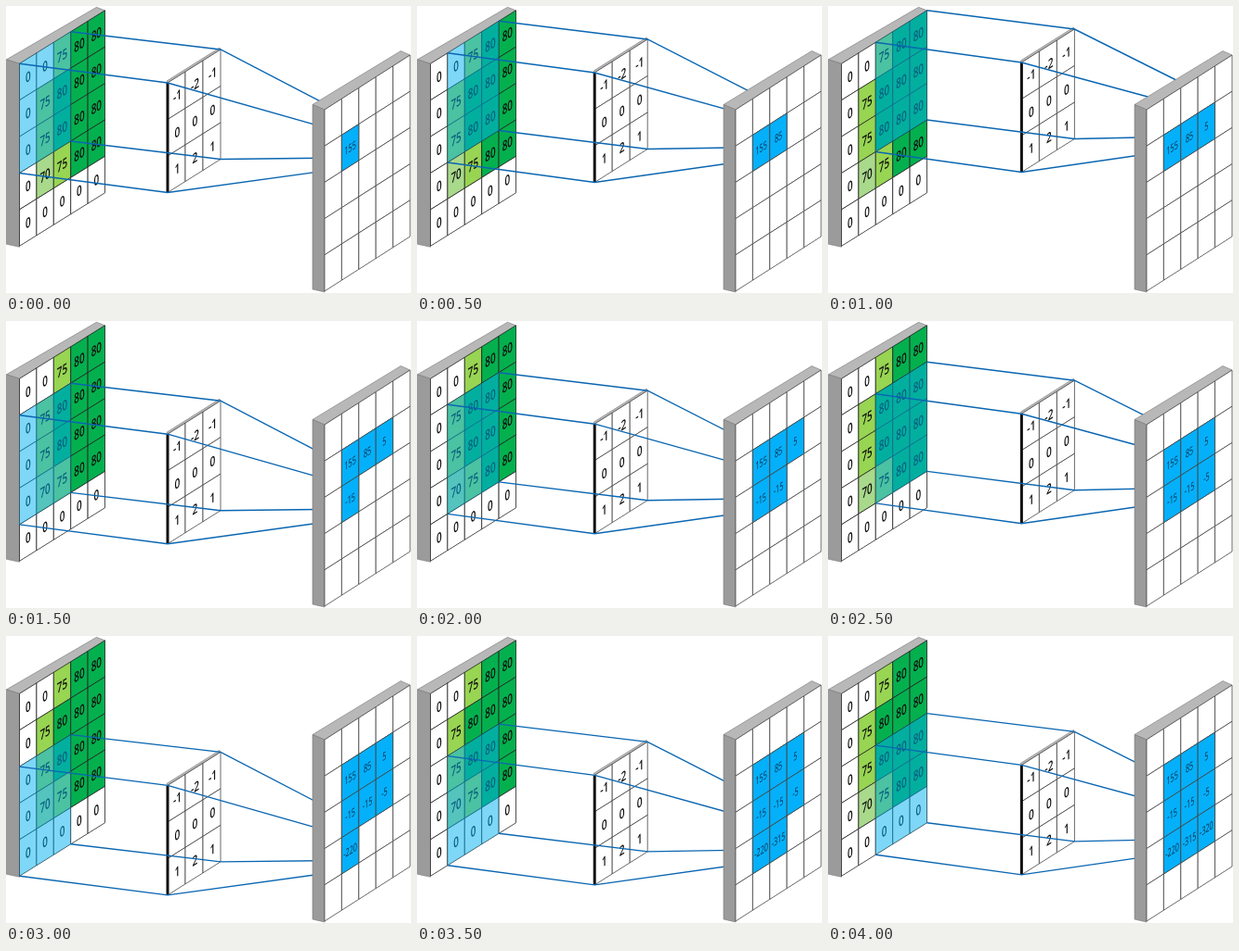
Write an HTML page that moves like this. It is 436 px wide and 310 px high and loops after 4500 ms.

```html
<!DOCTYPE html>
<html lang="en">
<head>
<meta charset="utf-8">
<title>Convolution</title>
<style>
  html, body { margin: 0; width: 100%; height: 100%; overflow: hidden; background: #fff; }
  svg { display: block; width: 436px; height: 310px; }
  text { font-family: "Open Sans", "Noto Sans", sans-serif; font-weight: 600; text-anchor: middle; fill: #111; }
  .cell { stroke: #444; stroke-width: .8; }
  .side { fill: #9b9b9b; stroke: #777; stroke-width: .6; }
  .edge { fill: #b8b8b8; stroke: #777; stroke-width: .6; }
  .patch { fill: #00b0f0; fill-opacity: .5; }
  .ray { fill: none; stroke: #0a66b2; stroke-width: 1.4; }
  #input .cell { stroke: #222; }
  #output text { fill: #0b2c48; font-weight: 400; }
</style>
</head>
<body>
<svg viewBox="0 0 436 310">
  <g id="input"></g>
  <g id="kernel"></g>
  <g id="rays"></g>
  <g id="output"></g>
</svg>
<script>
const STEP_MS = 500;
const WHITE = '#fff', PALE = '#a9d98b', LIME = '#98d552', GREEN = '#04b04e', BLUE = '#05b0fa';
const $ = id => document.getElementById(id);

const inputValues = [
  [0, 0, 75, 80, 80],
  [0, 75, 80, 80, 80],
  [0, 75, 80, 80, 80],
  [0, 70, 75, 80, 80],
  [0, 0, 0, 0, 0]
];
const kernelValues = [[-1, -2, -1], [0, 0, 0], [1, 2, 1]];
const results = [155, 85, 5, -15, -15, -5, -220, -315, -320];
const shades = { 0: WHITE, 70: PALE, 75: LIME, 80: GREEN };

// Oblique planes: origin, column vector (dx, dy), row height
const inputPlane = { x: 14.5, y: 62.3, dx: 18.4, dy: -11.5, h: 39.4 };
const outputPlane = { x: 343, y: 112, dx: 18.4, dy: -11.8, h: 39.2 };
const kernelPlane = { x: 174, y: 83, dx: 19, dy: -12, h: 39.5 };

function add(parent, tag, attrs) {
  const node = document.createElementNS('http://www.w3.org/2000/svg', tag);
  for (const name in attrs) node.setAttribute(name, attrs[name]);
  return parent.appendChild(node);
}

const at = (p, col, row) => [p.x + col * p.dx, p.y + col * p.dy + row * p.h];

const quad = (p, col, row, n = 1) =>
  [at(p, col, row), at(p, col + n, row), at(p, col + n, row + n), at(p, col, row + n)];

const polygon = (parent, points, attrs) =>
  add(parent, 'polygon', { points: points.join(' '), ...attrs });

function label(parent, p, col, row, value, size, squeeze) {
  const [x, y] = at(p, col + .5, row + .5);
  const slope = squeeze * p.dy / p.dx;
  const node = add(parent, 'text', {
    transform: `matrix(${squeeze} ${slope} 0 1 ${x} ${y})`, y: size * .36, 'font-size': size
  });
  node.textContent = value;
}

function labels(parent, p, values, size, squeeze) {
  values.forEach((line, row) =>
    line.forEach((value, col) => label(parent, p, col, row, value, size, squeeze)));
}

function slab(parent, p, depth, rise, shift) {
  const [tl, tr, , bl] = quad(p, 0, 0, 5);
  const back = [tl[0] - depth, tl[1] - rise];
  polygon(parent, [back, [tr[0] - shift, tr[1] - rise + 1], tr, tl], { class: 'edge' });
  polygon(parent, [back, tl, [bl[0], bl[1] + 1], [bl[0] - depth, bl[1] - 2]], { class: 'side' });
}

function grid(parent, p, n, fill) {
  for (let row = 0; row < n; row++)
    for (let col = 0; col < n; col++)
      polygon(parent, quad(p, col, row), { class: 'cell', fill: fill(row, col) });
}

// Input
slab($('input'), inputPlane, 14, 4.5, 9);
grid($('input'), inputPlane, 5, (r, c) => shades[inputValues[r][c]]);
labels($('input'), inputPlane, inputValues, 15, .66);
const patch = polygon($('input'), [], { class: 'patch' });

// Kernel
const [kTL, kTR, , kBL] = quad(kernelPlane, 0, 0, 3);
polygon($('kernel'), [[kTL[0] - 1, kTL[1] - 2], [kTR[0] - 1, kTR[1] - 2], kTR, kTL], { class: 'edge' });
grid($('kernel'), kernelPlane, 3, () => WHITE);
add($('kernel'), 'path', { d: `M${kTL}L${kBL}`, stroke: '#111', 'stroke-width': 3 });
labels($('kernel'), { ...kernelPlane, x: kernelPlane.x + 1 }, kernelValues, 14.5, .7);

// Output
slab($('output'), outputPlane, 13, 5.5, 10);
grid($('output'), outputPlane, 5, () => WHITE);
const resultCells = results.map((value, i) => {
  const row = 1 + Math.floor(i / 3), col = 1 + i % 3;
  const group = add($('output'), 'g', {});
  polygon(group, quad(outputPlane, col, row), { class: 'cell', fill: BLUE });
  label(group, outputPlane, col, row, value, 12, .6);
  return group;
});

const rays = Array.from({ length: 4 }, () => add($('rays'), 'path', { class: 'ray' }));

function show(step) {
  const row = Math.floor(step / 3), col = step % 3;
  const dx = col * 17.2, dy = row * 39.2 - col * 11;
  const from = quad(inputPlane, col, row, 3);
  const via = quad({ ...kernelPlane, x: kernelPlane.x + dx, y: kernelPlane.y + dy }, 0, 0, 3);
  const to = quad({ ...outputPlane, y: outputPlane.y - 3 }, col + 1, row + 1);

  patch.setAttribute('points', from.join(' '));
  $('kernel').setAttribute('transform', `translate(${dx} ${dy})`);
  rays.forEach((ray, i) => ray.setAttribute('d', `M${from[i]}L${via[i]}L${to[i]}`));
  resultCells.forEach((cell, i) => cell.setAttribute('visibility', i <= step ? 'visible' : 'hidden'));
}

function tick() {
  show(Math.floor(performance.now() / STEP_MS) % results.length);
  requestAnimationFrame(tick);
}
tick();
</script>
</body>
</html>
```
